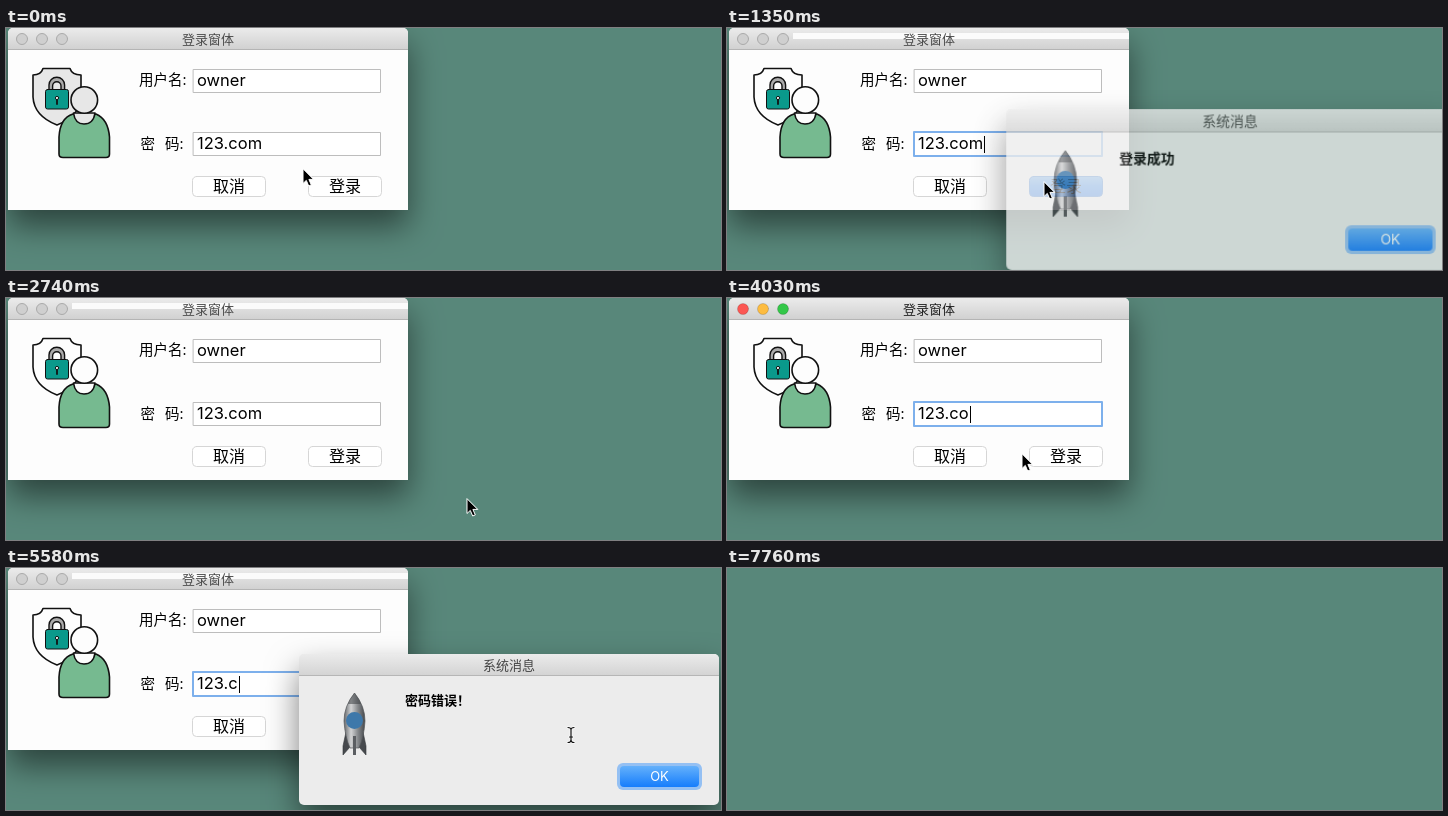
These frames come from a looping animation (715 by 242 pixels, 8120 ms). An HTML page with a canvas:

```html
<!DOCTYPE html>
<html lang="zh-CN">
<head>
<meta charset="utf-8">
<title>登录窗体</title>
<style>
html, body { margin: 0; width: 100%; height: 100%; overflow: hidden; background: #58877a; }
canvas { display: block; }
</style>
</head>
<body>
<canvas id="stage" width="715" height="242"></canvas>
<script>
const W = 715, H = 242, LOOP = 8120;
const stage = document.getElementById('stage').getContext('2d');
const layer = document.createElement('canvas');
layer.width = 800;
layer.height = 320;
const panel = layer.getContext('2d');

const CJK = '"Noto Sans CJK SC", "Noto Sans CJK", sans-serif';
const LATIN = 'Inter, "Open Sans", sans-serif';
const CENTER = { x: 503, y: 161.5 };

// Pointer stops: time, x, y
const POINTER = [
  [0, 297, 141], [200, 297, 141], [590, 317, 154], [1350, 317, 154],
  [1930, 655, 207], [2150, 655, 207], [2560, 461, 201], [2740, 461, 201],
  [3210, 290, 117], [3590, 290, 117], [3790, 295, 156], [4250, 295, 156],
  [4820, 346, 156], [5330, 346, 156], [5580, 565, 167], [5910, 655, 207],
  [6250, 655, 207], [6780, 314, 169], [6960, 225, 158], [7250, 225, 158],
  [7760, 650, 250]
];
// Dialog zoom: ms since opening, scale
const ZOOM = [[0, .12], [60, .26], [120, .62], [180, 1], [220, 1.066], [270, 1.05], [340, 1]];
const DIALOGS = [
  { open: 1130, press: 1990, close: 2150, text: '登录成功' },
  { open: 5110, press: 5970, close: 6150, text: '密码错误！' }
];
const FADE = 200, CLOSED = 7190;

const within = (t, a, b) => t >= a && t < b;
const smooth = u => u * u * (3 - 2 * u);

function track(keys, t, ease = u => u) {
  const i = keys.findIndex(k => k[0] > t);
  if (i < 0) return keys[keys.length - 1].slice(1);
  if (i === 0) return keys[0].slice(1);
  const a = keys[i - 1], b = keys[i];
  const u = ease((t - a[0]) / (b[0] - a[0]));
  return a.slice(1).map((v, n) => v + (b[n + 1] - v) * u);
}

function vertical(c, y0, y1, ...colors) {
  const g = c.createLinearGradient(0, y0, 0, y1);
  colors.forEach((color, i) => g.addColorStop(i / (colors.length - 1), color));
  return g;
}

function box(c, x, y, w, h, r, fill, line) {
  c.beginPath();
  c.roundRect(x, y, w, h, r);
  if (fill) { c.fillStyle = fill; c.fill(); }
  if (line) { c.strokeStyle = line; c.lineWidth = 1; c.stroke(); }
}

function disc(c, x, y, r, fill, line, width = 1) {
  c.beginPath();
  c.arc(x, y, r, 0, Math.PI * 2);
  c.fillStyle = fill;
  c.fill();
  if (line) { c.strokeStyle = line; c.lineWidth = width; c.stroke(); }
}

function shape(c, d, fill, line, width = 1.6) {
  const p = new Path2D(d);
  if (fill) { c.fillStyle = fill; c.fill(p); }
  if (line) { c.strokeStyle = line; c.lineWidth = width; c.stroke(p); }
}

function label(c, text, x, y, font, color = '#000', align = 'left') {
  c.font = font;
  c.fillStyle = color;
  c.textAlign = align;
  c.fillText(text, x, y);
}

function frame(c, x, y, w, h, radii, fill) {
  c.save();
  c.shadowColor = 'rgba(0,0,0,.5)';
  c.shadowBlur = 32;
  c.shadowOffsetY = 16;
  box(c, x, y, w, h, radii, fill);
  c.restore();
}

function portrait(c, pale) {
  c.lineJoin = c.lineCap = 'round';
  shape(c, 'M27 47Q35 47 37 40.5H64Q66 47 75 47V69Q74 88 51 97Q28 88 27 69Z', pale, '#111');
  shape(c, 'M43 62V57A7.8 7.8 0 0 1 58.600 57V62H55V58A4.200 4.200 0 0 0 46.600 58V62Z', '#aaa', '#111', 1.4);
  box(c, 39.5, 61.5, 23, 19.5, 2, '#0a998b', '#111');
  disc(c, 51, 70, 1.6, '#fff', '#111');
  shape(c, 'M51 72V76', null, '#111', 1.8);
  shape(c, 'M53 126V109Q54 90 67 86L78 90L90 86Q102 91 103.500 109V126Q103.500 129.500 100 129.500H57Q53 129.500 53 126Z', '#76ba90', '#111');
  shape(c, 'M67.500 85Q69 96 78 96Q87.500 96 89 85Z', pale, '#111');
  disc(c, 78.3, 72, 13.3, pale, '#111', 1.6);
}

function button(x, text, active) {
  const fill = active ? vertical(stage, 148, 169, '#62aefb', '#2485fa', '#106cee') : '#fff';
  box(stage, x + .5, 148.5, 73, 20, 4, fill, active ? '#2f78d8' : '#d6d6d6');
  label(stage, text, x + 37, 164, '16px ' + CJK, '#000', 'center');
}

function field(y, text, focused, caret) {
  box(stage, 187.5, y + .5, 187, 23, 0, '#fff', '#bdbdbd');
  if (focused) {
    stage.strokeStyle = '#7db0ec';
    stage.lineWidth = 2;
    stage.strokeRect(187, y, 188, 24);
  }
  label(stage, text, 191, y + 17, '16.5px ' + LATIN);
  if (caret) stage.fillRect(Math.round(192 + stage.measureText(text).width), y + 4, 1, 17);
}

function loginWindow(t) {
  const c = stage;
  const touched = t >= 950;
  const key = within(t, 950, 1130) || within(t, 3210, 5110) || t >= 7010;
  const focused = within(t, 950, 2150) || within(t, 3210, 6150);
  const pressed = within(t, 950, 2150) || within(t, 4940, 6150);
  const caret = focused && !within(t, 3630, 4030);
  const password = t < 4030 ? '123.com' : t < 4220 ? '123.co' : '123.c';

  frame(c, 2, 0, 400, 182, [5, 5, 0, 0], '#fdfdfd');
  box(c, 2, 0, 400, 21, [5, 5, 0, 0], vertical(c, 0, 21, '#ebebeb', '#d1d1d1'));
  if (touched && !key) {
    c.fillStyle = '#fbfbfb';
    c.fillRect(66, 5, 336, 6);
  }
  c.fillStyle = '#b4b4b4';
  c.fillRect(2, 21, 400, 1);
  const lights = key ? ['#fc5753', '#fdbc40', '#33c748'] : ['#cfcfcf', '#cfcfcf', '#cfcfcf'];
  lights.forEach((color, i) => disc(c, 16 + i * 20, 11, 5.5, color, key ? 'rgba(0,0,0,.15)' : '#aaa'));
  label(c, '登录窗体', 202, 16, '13px ' + CJK, key ? '#222' : '#4c4c4c', 'center');

  portrait(c, touched ? '#fdfdfd' : '#e7e7e7');
  const font = '14.5px ' + CJK;
  label(c, '用户名:', 133, 57, font);
  label(c, '密', 134.5, 120.5, font);
  label(c, '码:', 159, 120.5, font);
  field(41, 'owner');
  field(104, password, focused, caret);
  button(186, '取消', t >= 7010);
  button(302, '登录', pressed);
}

function rocket(c) {
  const metal = c.createLinearGradient(337, 0, 360, 0);
  metal.addColorStop(0, '#55585c');
  metal.addColorStop(.35, '#d2d3d4');
  metal.addColorStop(.65, '#85888b');
  metal.addColorStop(1, '#3d4044');
  shape(c, 'M340 164L337 178V187L344 179H353L360 187V178L357 164Z', '#46494d', '#33363a', .6);
  shape(c, 'M348.500 125Q359 138 359 153Q358 169 353 180H344Q339 169 338 153Q338 138 348.500 125Z', metal, '#55585b', .7);
  shape(c, 'M348.500 125Q353 130 355 136H342Q344 130 348.500 125Z', 'rgba(60,63,67,.55)');
  disc(c, 348.5, 152.5, 8.5, '#3e78aa');
  shape(c, 'M347 168H350V187H347Z', '#5b5e62');
}

function paintDialog(text, pressed) {
  const c = panel;
  c.clearRect(0, 0, layer.width, layer.height);
  frame(c, 293, 86, 420, 151, 5, '#ececec');
  box(c, 293, 86, 420, 22, [5, 5, 0, 0], vertical(c, 86, 108, '#ebebeb', '#d3d3d3'));
  c.fillStyle = '#b6b6b6';
  c.fillRect(293, 107, 420, 1);
  label(c, '系统消息', 503, 102, '13px ' + CJK, '#444', 'center');
  rocket(c);
  label(c, text, 399, 137, 'bold 13px ' + CJK);
  box(c, 611, 195, 85, 27, 6, '#94c0f3');
  const blues = pressed ? ['#4694f3', '#0b55cc'] : ['#64b1fb', '#167dfc'];
  box(c, 614, 198, 79, 21, 4, vertical(c, 198, 219, ...blues));
  label(c, 'OK', 653.5, 213, '13px ' + LATIN, '#fff', 'center');
}

function dialog(t, { open, press, close, text }) {
  if (!within(t, open, close + FADE)) return;
  const [scale] = track(ZOOM, t - open);
  const shown = Math.min(1, (t - open + 60) / 355);
  const left = t < close ? 1 : 1 - (t - close) / FADE;
  paintDialog(text, within(t, press, close));
  stage.save();
  stage.globalAlpha = shown * left;
  stage.translate(CENTER.x, CENTER.y);
  stage.scale(scale, scale);
  stage.drawImage(layer, -CENTER.x, -CENTER.y);
  stage.restore();
}

function pointer(t) {
  if (t >= 7760) return;
  const [x, y] = track(POINTER, t, smooth);
  const inField = x > 187 && x < 375 && y > 104 && y < 128;
  const overText = DIALOGS.some(d => within(t, d.open, d.close)) && x > 395 && y < 192;
  stage.save();
  stage.translate(x, y);
  stage.lineJoin = 'round';
  if (inField || overText) {
    const beam = 'M-3 -7.500Q0 -7.500 0 -5V5Q0 7.500 -3 7.500M3 -7.500Q0 -7.500 0 -5M0 5Q0 7.500 3 7.500M-1.500 2H1.500';
    shape(stage, beam, null, 'rgba(255,255,255,.8)', 2.6);
    shape(stage, beam, null, '#111', 1.2);
  } else {
    shape(stage, 'M0 0V14.500L3.300 11.400L5.700 17L8.300 15.900L5.900 10.400H10.400Z', '#000', '#fff', 1);
  }
  stage.restore();
}

function draw(t) {
  stage.fillStyle = '#58877a';
  stage.fillRect(0, 0, W, H);
  if (t < CLOSED) loginWindow(t);
  DIALOGS.forEach(d => dialog(t, d));
  pointer(t);
}

const start = performance.now();
function tick() {
  draw((performance.now() - start) % LOOP);
  requestAnimationFrame(tick);
}
tick();
</script>
</body>
</html>
```
